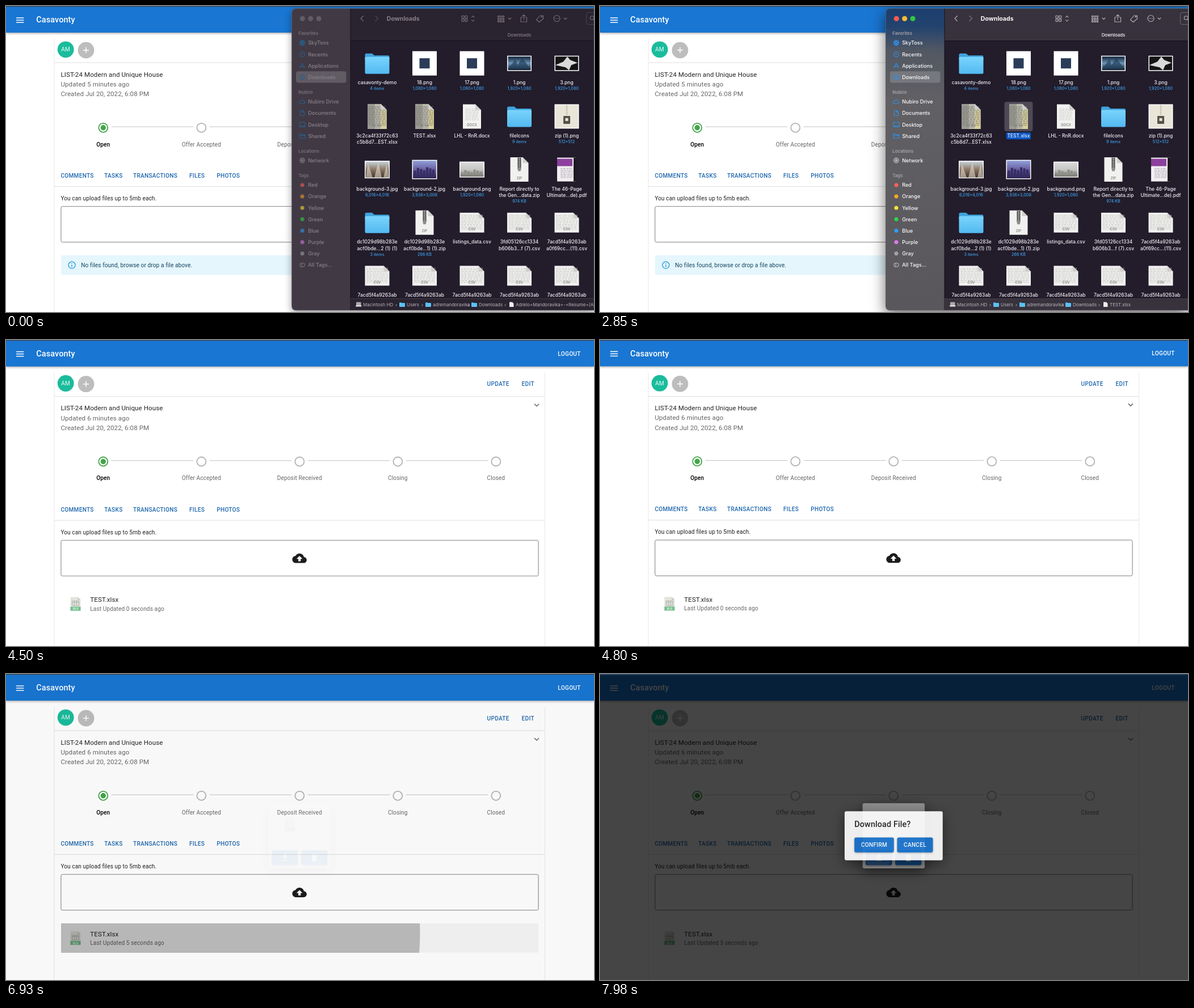
An HTML page that plays this animation: 1036x540 px, repeating every 8 s.

```html
<!DOCTYPE html>
<html lang="en">
<head>
<meta charset="utf-8">
<title>File upload</title>
<style>
html, body { margin: 0; width: 100%; height: 100%; overflow: hidden; background: #fff; }
svg { display: block; width: 1036px; height: 540px; }
text { white-space: pre; }
.h6 { font: 500 14.4px Roboto, sans-serif; letter-spacing: .0075em; }
.b1 { font: 400 11.52px Roboto, sans-serif; letter-spacing: .0094em; }
.b2 { font: 400 10.08px Roboto, sans-serif; letter-spacing: .0107em; }
.btn { font: 500 10.08px Roboto, sans-serif; letter-spacing: .0286em; }
.sub { fill: #666; }
.link { fill: #1f68ae; }
.mid { text-anchor: middle; }
.side { font: 500 9.1px Inter, sans-serif; fill: var(--text); }
.cap { font: 600 7.8px Inter, sans-serif; fill: var(--cap); }
.bar { font: 700 10.6px Inter, sans-serif; fill: var(--text); }
.tab { font: 500 7.8px Inter, sans-serif; fill: var(--text); text-anchor: middle; }
.name { font: 500 8.5px Inter, sans-serif; fill: #f1eff3; text-anchor: middle; }
.info { font: 500 7.2px Inter, sans-serif; fill: #3f9fe6; text-anchor: middle; }
.path { font: 400 8px Inter, sans-serif; fill: #b9b5bd; }
.kind { font: 500 6px Inter, sans-serif; fill: #777; text-anchor: middle; }
.line { fill: none; stroke: var(--icon); stroke-width: 1.1; stroke-linecap: round; stroke-linejoin: round; }
.blue { fill: none; stroke: var(--blue); stroke-width: 1.1; stroke-linejoin: round; }
#finder { --text: #87818b; --cap: #77717b; --icon: #77717b; --blue: #285f8e; --bar: #2a2330; --dim: .55; }
#finder.on { --text: #fbfafc; --cap: #a5a4a9; --icon: #b6b2ba; --blue: #2a93ee; --bar: #38323d; --dim: 1; }
#frame { filter: drop-shadow(0 5px 7px rgba(0,0,0,.4)); }
.on #frame { filter: drop-shadow(0 8px 13px rgba(0,0,0,.6)); }
#glass { opacity: 0; }
.on #glass { opacity: 1; }
.tags { opacity: var(--dim); }
.lift { filter: drop-shadow(0 1.5px 1.5px rgba(0,0,0,.35)); }
.modal { filter: drop-shadow(0 6px 11px rgba(0,0,0,.5)); }
</style>
</head>
<body>
<svg id="stage" viewBox="0 0 1036 540" xmlns="http://www.w3.org/2000/svg"></svg>
<script>
const T = (x, y, s, cls, more = '') => `<text x="${x}" y="${y}" class="${cls}" ${more}>${s}</text>`;
const R = (x, y, w, h, fill, r = 0, more = '') =>
  `<rect x="${x}" y="${y}" width="${w}" height="${h}" rx="${r}" fill="${fill}" ${more}/>`;
const C = (x, y, r, fill, more = '') => `<circle cx="${x}" cy="${y}" r="${r}" fill="${fill}" ${more}/>`;
const P = (d, more = '') => `<path d="${d}" ${more}/>`;
const G = (body, more = '') => `<g ${more}>${body}</g>`;
const at = (x, y, body) => G(body, `transform="translate(${x} ${y})"`);
const grad = (id, ...stops) => `<linearGradient id="${id}" x2="0" y2="1">` +
  stops.map(([o, c]) => `<stop offset="${o}" stop-color="${c}"/>`).join('') + '</linearGradient>';

const defs = `<defs>
  ${grad('glassFill', [0, '#1d3f70'], [.06, '#24436e'], [.14, '#525863'], [.3, '#616064'], [1, '#59575b'])}
  ${grad('folder', [0, '#7ad4fc'], [1, '#52b9f1'])}
  ${grad('city', [0, '#10243c'], [.5, '#6d94b5'], [1, '#0d1b2c'])}
  ${grad('towers', [0, '#c9d3da'], [.5, '#8a7766'], [1, '#3c332d'])}
  ${grad('dusk', [0, '#8e9fda'], [.5, '#6a5f9f'], [1, '#271f4a'])}
  ${grad('fog', [0, '#dadada'], [.5, '#c6c6c4'], [1, '#77776f'])}
  <clipPath id="row"><rect x="97" y="440" width="841" height="52"/></clipPath>
  <clipPath id="down"><rect x="468" y="311" width="46" height="26" rx="3"/></clipPath>
  <clipPath id="list"><rect x="607" y="62" width="429" height="454"/></clipPath>
</defs>`;

// ---- web page ----
const xls = (x, y) => at(x, y,
  P('M0 0h13l5 5v19H0z', 'fill="#e3e3dd"') + P('M13 0v5h5z', 'fill="#c3c9c0"') +
  P('M3 7h12v8H3zM3 9.5h12M7 7v8M11 7v8', 'fill="none" stroke="#a9aea6" stroke-width=".9"') +
  R(0, 17, 18, 7, '#74bf8e') +
  T(9, 22.6, 'XLS', 'mid', 'font-family="Roboto, sans-serif" font-size="5.6" font-weight="700" fill="#e6f4ea"'));

function stepper() {
  return ['Open', 'Offer Accepted', 'Deposit Received', 'Closing', 'Closed'].map((s, i) => {
    const x = 171.3 + 173 * i, c = i ? '#b3b3b3' : '#43a548';
    return (i < 4 ? R(x + 14.5, 212.6, 144.5, 1, '#c2c2c2') : '') +
      C(x, 214.8, 8, 'none', `stroke="${c}" stroke-width="1.8"`) + (i ? '' : C(x, 214.8, 4.7, c)) +
      T(x, 247.6, s, 'b2 mid', i ? 'fill="#666"' : 'font-weight="500" style="font-weight:500"');
  }).join('');
}

const cloud = 'M19.35 10.04C18.67 6.59 15.64 4 12 4 9.11 4 6.6 5.64 5.35 8.04 2.34 8.36 0 10.91 0 14c0 3.31 2.69 6 6 6h13c2.76 0 5-2.24 5-5 0-2.64-2.05-4.78-4.65-4.96zM14 13v4h-4v-4H7l5-5 5 5h-3z';
const page = G(
  R(0, 0, 1036, 47, '#1976d2', 0, 'style="filter:drop-shadow(0 1.5px 2px rgba(0,0,0,.4))"') +
  [20.2, 24.2, 28.2].map(y => R(18, y, 13.4, 1.5, '#fff')).join('') +
  T(53.3, 29.2, 'Casavonty', 'h6', 'fill="#fff"') + T(972.3, 28, 'LOGOUT', 'btn', 'fill="#fff"') +
  R(84.5, 58, 1, 482, '#e8e8e8') + R(949, 58, 1, 482, '#e8e8e8') +
  R(85, 99.5, 864, 1, '#dedede') + R(85, 318, 864, 1, '#dedede') +
  C(105.2, 76.8, 14.4, '#1abc9c') + T(105.2, 80.4, 'AM', 'btn mid', 'fill="#e8fbf6" style="font-weight:400"') +
  C(141, 78, 14.4, '#bdbdbd') + P('M136 78h10M141 73v10', 'stroke="#fff" stroke-width="1.5"') +
  T(847.6, 81.6, 'UPDATE', 'btn link') + T(908.6, 81.6, 'EDIT', 'btn link') +
  P('M931 113l4 4 4-4', 'fill="none" stroke="#666" stroke-width="1.5"') +
  T(96.4, 124.5, 'LIST-24 Modern and Unique House', 'b1', 'fill="#212121"') +
  T(96.4, 142, '', 'b1 sub', 'id="updated"') +
  T(96.4, 159.2, 'Created Jul 20, 2022, 6:08 PM', 'b1 sub') +
  stepper() +
  [['COMMENTS', 96.4], ['TASKS', 173.3], ['TRANSACTIONS', 224], ['FILES', 323], ['PHOTOS', 371.3]]
    .map(([s, x]) => T(x, 303, s, 'btn link')).join('') +
  T(96.4, 343, 'You can upload files up to 5mb each.', 'b2', 'fill="#212121"') +
  R(97, 353.7, 841, 63, '#fff', 2.5, 'stroke="#8d8d8d" style="filter:drop-shadow(0 .8px .5px rgba(0,0,0,.3))"') +
  at(504.4, 372.7, P(cloud, 'transform="scale(1.06)" fill="#1c1c1c"')) +
  G(R(97, 440, 841, 34.5, '#e5f6fd', 3) +
    C(116, 457.2, 6, 'none', 'stroke="#1c95d6" stroke-width="1.2"') +
    P('M116 453.8v1.4M116 456.6v4', 'stroke="#1c95d6" stroke-width="1.3"') +
    T(132.3, 460.8, 'No files found, browse or drop a file above.', 'b2', 'fill="#14455f"'), 'id="alert"') +
  G(R(97, 440, 841, 51.7, '#f3f3f3', 0, 'id="hover"') + xls(113.5, 454) +
    T(148.3, 462.6, 'TEST.xlsx', 'b1', 'fill="#212121"') + T(148.3, 478, '', 'b2 sub', 'id="ago"') +
    G(C(261, 457, 0, '#000', 'id="ripple"'), 'clip-path="url(#row)"'), 'id="file"'), 'id="page"');

// ---- file window ----
const fold = (w, h, body) => P(`M${-w / 2} ${-h / 2}h${w - 10}l10 10v${h - 10}h${-w}z`, 'fill="#f1f1ef"') + body +
  P(`M${w / 2 - 10} ${-h / 2}v10h10z`, 'fill="#cfcfcc"');
const rules = (w, n, y, c) => Array.from({ length: n }, (_, i) =>
  P(`M${-w / 2} ${y + i * 2.7}h${w}`, `stroke="${c}" stroke-width="1" stroke-dasharray="${3 + i % 3} 1 ${5 - i % 2} 1.6"`)).join('');
const kind = (s, y = 19) => T(0, y, s, 'kind');
const photo = (w, h, fill, body = '') => R(-w / 2, -h / 2, w, h, '#fff') + R(1.5 - w / 2, 1.5 - h / 2, w - 3, h - 3, fill) + body;
const bars = (c, base, top) => [0, 1, 2, 3, 4, 5, 6].map(i =>
  R(-19 + i * 5.4, base - top - (i * 5 % 7), 4, top + (i * 5 % 7), c)).join('');
const art = {
  folder: P('M-21.5-15q0-2.5 2.500-2.500h10l4 3.500h24q2.500 0 2.500 2.500v5h-43z', 'fill="#3fa3dc"') +
    R(-21.5, -11.5, 43, 30, 'url(#folder)', 2.5),
  mark: R(-21.5, -21.5, 43, 43, '#fff') + R(-9, -9, 18, 18, '#2a3c58'),
  city: photo(43, 27, 'url(#city)', P('M-19 9l12-16 4 10 8-13 13 18z', 'fill="#22425f" opacity=".7"')),
  hands: photo(43, 27, '#151515', P('M-20 3l14-6 7-9 5 6 13 5-11 4-4 9-6-5z', 'fill="#d9d9d9"')),
  xlsx: fold(33, 44, R(-16.5, -22, 13, 44, '#9b9b94') + R(-3.5, -22, 10, 44, '#bbb9ac') + R(6.5, -12, 10, 34, '#d8d09b') +
    rules(31, 13, -17, '#77776f')) + kind('XLSX'),
  docx: fold(32, 43, rules(23, 8, -13, '#c9c9c9')) + kind('DOCX', 17),
  zip: fold(32, 43, R(-3, -21, 6, 21, '#4b4b4b') + P('M0-21v18', 'stroke="#ddd" stroke-width="3" stroke-dasharray="1 1.5"') +
    R(-2.5, -4, 5, 7, '#8d8d8d', 1)) + kind('ZIP', 17),
  zipPng: R(-21.5, -21.5, 43, 43, '#fff') + R(-20, -20, 40, 40, '#e9e5d9') + P('M0-20v18', 'stroke="#b8ae95" stroke-width="2.5" stroke-dasharray="1.5 1.5"') +
    R(-6, -1, 12, 14, '#55524b', 1) + R(-2.5, 3, 5, 5, '#e9e5d9'),
  towers: photo(44, 31, 'url(#towers)', P('M-20 14l4-24 8 24zM-5 14l7-27 6 27zM11 14l6-24 3 24z', 'fill="#e4d9c9" opacity=".6"')),
  dusk: photo(44, 34, 'url(#dusk)', bars('#372d66', 14, 12)),
  fog: photo(44, 28, 'url(#fog)', bars('#8d8d88', 9, 3)),
  pdf: R(-17, -21, 34, 42, '#f2eff2') + R(-17, -19, 27, 13, '#8d3f9e') + R(12, -21, 5, 42, '#1d1a20') + rules(22, 7, -2, '#a8a2aa'),
  csv: fold(43, 35, rules(38, 10, -13, '#c3c3c0')) + kind('CSV', 14)
};
const hash = '7acd5f4a9263ab';
const files = [
  ['folder', 'casavonty-demo', '', '4 items'], ['mark', '18.png', '', '1,080×1,080'], ['mark', '17.png', '', '1,080×1,080'],
  ['city', '1.png', '', '1,920×1,080'], ['hands', '3.png', '', '1,920×1,080'],
  ['xlsx', '3c2ca4f33f72c63', 'c5b8d7...EST.xlsx'], ['xlsx', 'TEST.xlsx'], ['docx', 'LHL - RnR.docx'],
  ['folder', 'fileIcons', '', '9 items'], ['zipPng', 'zip (1).png', '', '512×512'],
  ['towers', 'background-3.jpg', '', '6,016×4,016'], ['dusk', 'background-2.jpg', '', '3,936×3,008'],
  ['fog', 'background.png', '', '1,920×1,080'], ['zip', 'Report directly to', 'the Gen...data.zip', '974 KB'],
  ['pdf', 'The 46-Page', 'Ultimate...de).pdf'],
  ['folder', 'dc1029d98b283e', 'acf0bde...2 (1) (1)', '3 items'], ['zip', 'dc1029d98b283e', 'acf0bde...1) (1).zip', '266 KB'],
  ['csv', 'listings_data.csv'], ['csv', '3fd05126cc1334', 'b606b3...f (7).csv'], ['csv', hash, 'a0f69cc...(11).csv'],
  ...Array(5).fill(['csv', hash])
];
const grid = files.map(([icon, a, b, info], i) => at(654 + i % 5 * 83.5, 101.2 + Math.floor(i / 5) * 93.7,
  art[icon] + T(0, 37, a, 'name') + (b ? T(0, 48.3, b, 'name') : '') + (info ? T(0, b ? 58.3 : 47.3, info, 'info') : ''))).join('');

const pill = R(-21.5, 28.3, 43, 12, '#0a58c9', 2) + T(0, 37, 'TEST.xlsx', 'name');
const picked = at(737.5, 194.9, R(-25, -26, 50, 52, '#fff', 4, 'opacity=".2"') + art.xlsx + pill);

const glyph = {
  drop: C(0, 0, 4.6, 'var(--blue)', 'opacity=".75"'),
  clock: C(0, 0, 4.4, 'none') + P('M0-2.500v2.700h-2'),
  app: P('M-4.500 4l4.500-8.500 4.500 8.500M-4 1.500h8'),
  arrow: C(0, 0, 4.4, 'none') + P('M0-2.500v5M-2 .5l2 2 2-2'),
  cloud: P('M-3 3.500q-3-.5-2.300-3.200 1-2 2.800-1.300 1-3 4-2 1.800 1 1.600 2.700 2.400.6 1.800 2.600-.6 1.200-2 1.200z'),
  doc: P('M-3.500-4.500h4l3 3v6h-7zM.5-4.500v3h3'),
  desk: P('M-5-4h10v8h-10zM-5 2.500h10'),
  share: P('M-5-3.500h3.500l1 1.500h5.500v6h-10zM-5-.5h10'),
  net: C(0, 0, 4.4, 'none') + P('M-4 0h8M0-4v8M-2.800-2.800l5.600 5.600M2.800-2.800l-5.600 5.600')
};
const entry = (s, y, icon, cls = 'blue') => at(522, y, G(glyph[icon], `class="${cls}"`)) + T(532.2, y + 3.3, s, 'side');
const tags = [['Red', '#fa6159'], ['Orange', '#f7a823'], ['Yellow', '#fbe233'], ['Green', '#2bd944'],
  ['Blue', '#2f9df5'], ['Purple', '#e078ee'], ['Gray', '#a4a2a7']];
const sidebar =
  R(511, 115.3, 88.5, 20.3, '#fff', 4, 'opacity=".17"') +
  [['Favorites', 51], ['Nubiro', 155], ['Locations', 258.7], ['Tags', 302]].map(([s, y]) => T(515.3, y, s, 'cap')).join('') +
  entry('SkyToss', 65, 'drop') + entry('Recents', 85.2, 'clock') + entry('Applications', 105.4, 'app') + entry('Downloads', 125.5, 'arrow') +
  entry('Nubiro Drive', 168.8, 'cloud') + entry('Documents', 189, 'doc') + entry('Desktop', 209.2, 'desk') + entry('Shared', 229.3, 'share') +
  entry('Network', 272.5, 'net', 'line') +
  tags.map(([s, c], i) => G(C(522, 315.9 + i * 20.15, 3.5, c), 'class="tags"') + T(532.2, 319.2 + i * 20.15, s, 'side')).join('') +
  G(R(518, 453.8, 8, 6.4, 'none', 2.5) + P('M521 454v6'), 'class="line"') + T(532.2, 460.3, 'All Tags...', 'side');

const cells = (x, n, s) => Array.from({ length: n * n }, (_, i) => R(x + i % n * s, 17.3 + Math.floor(i / n) * s, s - 1.8, s - 1.8, 'none', .5)).join('');
const toolbar = ['#ff5b51', '#f6bd34', '#2fc844'].map((c, i) =>
    C(522.3 + i * 14.4, 22.3, 4.5, '#625c66') + C(522.3 + i * 14.4, 22.3, 4.5, c, 'class="lamp"')).join('') +
  T(670.8, 26, 'Downloads', 'bar') + T(904.5, 54, 'Downloads', 'tab') +
  G(P('M629.500 17.500l-4.500 4.500 4.500 4.500') + P('M651 17.500l4.500 4.500-4.500 4.500', 'opacity=".5"') +
    cells(803, 2, 5.8) + P('M820.500 20l2.300-2.500 2.300 2.500M820.500 24.500l2.300 2.500 2.300-2.500') +
    cells(866.5, 3, 4.3) + P('M885 21l2.500 2.500 2.500-2.500') +
    P('M909.500 20h-2.500v8h10.500v-8h-2.500M912.300 24v-8.500M909.800 18l2.500-2.500 2.500 2.500') +
    P('M934.500 24l6.500-7h5.500v5.500l-7 6z') + C(944, 19, .7, 'none') +
    C(970.5, 22, 5.5, 'none') + P('M967.500 22h.1M970.500 22h.1M973.500 22h.1', 'stroke-width="1.500"') + P('M983 21l2.500 2.500 2.500-2.500') +
    R(1022.5, 11.5, 40, 21, 'none', 4, 'opacity=".4"') + C(1032.5, 21, 3.2, 'none') + P('M1034.800 23.500l3 3'), 'class="line"');

const crumb = x => at(x + 5, 527, R(-5, -4, 4, 3, '#3fa3dc', .8) + R(-5, -3, 10, 7, '#5cc0f3', 1));
const pathbar = R(607, 516.5, 429, 20.5, 'var(--bar)') + R(607, 516, 429, .8, '#49434e') +
  R(617, 522.5, 8.5, 6, '#aaa', 1) + R(616.3, 528, 10, 2.5, '#dedede', .5) +
  [693, 739, 820].map(crumb).join('') +
  [['Macintosh HD', 629], ['Users', 706], ['adremandoravika', 752], ['Downloads', 833]].map(([s, x]) => T(x, 530, s, 'path')).join('') +
  [686, 732, 813, 878].map(x => T(x, 530, '›', 'path')).join('') +
  P('M887 522.500h5l2.500 2.500v6h-7.500z', 'fill="#eee"') + T(898, 530, '', 'path', 'id="leaf"');

const shape = 'M1036 4.500H511.500q-8 0-8 8V529q0 8 8 8H1036z';
const side = 'M607 4.500H511.500q-8 0-8 8V529q0 8 8 8H607z';
const finder = G(
  P(shape, 'fill="#221c2b" id="frame"') + P(side, 'fill="#413a45"') + P(side, 'fill="url(#glassFill)" id="glass"') +
  R(607, 4.5, 429, 57, 'var(--bar)') + R(607, 61, 429, 1, '#121016') + R(606.5, 4.5, 1, 532.5, '#17131b') +
  sidebar + toolbar + G(grid + G(picked, 'id="picked"'), 'clip-path="url(#list)"') + pathbar +
  P(shape, 'fill="none" stroke="#777079" stroke-opacity=".6"'), 'id="finder"');
const ghost = G(art.xlsx + pill, 'id="ghost" opacity=".85"');

// ---- dialogs ----
const icon24 = (x, y, d) => P(d, `transform="translate(${x} ${y}) scale(.72)" fill="#fff"`);
const button = (x, y, w, more = '') => R(x, y, w, 26.3, '#1976d2', 3, `class="lift" ${more}`);
const shade = id => R(0, 1.5, 1036, 538.5, '#000', 0, `id="${id}" opacity="0"`);
const dialogs = shade('shade1') +
  G(R(462.7, 228, 109.4, 115, '#fff', 3, 'class="modal"') + xls(491, 253.7) +
    button(468.3, 311, 46, 'id="save"') + button(520.2, 311, 46) +
    G(C(490.5, 323.3, 0, '#fff', 'id="ripple2"'), 'clip-path="url(#down)"') +
    icon24(482.6, 315.2, 'M5 20h14v-2H5v2zM19 9h-4V3H9v6H5l7 7 7-7z') +
    icon24(534.6, 315.5, 'M6 19c0 1.1.9 2 2 2h8c1.1 0 2-.9 2-2V7H6v12zM19 4h-3.500l-1-1h-5l-1 1H5v2h14V4z'), 'id="box1"') +
  shade('shade2') +
  G(R(431, 242.3, 172.8, 86.5, '#fff', 3, 'class="modal"') + T(448.3, 270, 'Download File?', 'h6', 'fill="#212121"') +
    button(448.2, 288.5, 69.6) + button(523.5, 288.5, 63) +
    T(483, 305.2, 'CONFIRM', 'btn mid', 'fill="#fff"') + T(555, 305.2, 'CANCEL', 'btn mid', 'fill="#fff"'), 'id="box2"');

document.getElementById('stage').innerHTML =
  defs + R(0, 0, 1036, 540, '#fff') + page + R(0, 0, 1036, 1.3, '#3b4653') + finder + ghost + dialogs;

// ---- timeline ----
const $ = id => document.getElementById(id);
const set = (id, o) => { for (const k in o) $(id).setAttribute(k, o[k]); };
const show = (id, on) => set(id, { visibility: on ? 'visible' : 'hidden' });
const label = (id, s) => { if ($(id).textContent !== s) $(id).textContent = s; };
const span = (t, a, b) => Math.min(1, Math.max(0, (t - a) / (b - a)));

// cubic-bezier(.4, 0, .2, 1)
function ease(x) {
  let lo = 0, hi = 1;
  for (let i = 0; i < 20; i++) {
    const s = (lo + hi) / 2, q = 1 - s;
    if (1.2 * q * q * s + .6 * q * s * s + s * s * s < x) lo = s; else hi = s;
  }
  return lo * lo * (3 - 2 * lo);
}
function ripple(id, t, start, from, release, max) {
  const k = ease(span(t, start, start + 550));
  const alpha = (.1 + .2 * k) * (1 - ease(span(t, release, release + 550)));
  set(id, { r: max * k, opacity: t < from ? 0 : alpha });
}

function draw(t) {
  const focus = t >= 1290;
  $('finder').setAttribute('class', focus ? 'on' : '');
  document.querySelectorAll('.lamp').forEach(e => e.setAttribute('opacity', focus ? 1 : 0));
  set('finder', { opacity: 1 - ease(span(t, 2835, 3270)) });
  $('finder').style.display = t < 3270 ? '' : 'none';
  $('picked').style.display = focus ? '' : 'none';
  label('leaf', focus ? 'TEST.xlsx' : 'Adrelo+Mandoravika+-+Resume+(Apr');

  const p = span(t, 1890, 2670), d = p * p * (3 - 2 * p);
  show('ghost', t >= 1890 && t < 2700);
  set('ghost', { transform: `translate(${702.7 - 380.2 * d} ${198 + 196 * d})` });

  const nudge = ease(span(t, 4350, 4800)) - ease(span(t, 4920, 4980));
  set('page', { transform: `translate(0 ${-.6 * nudge})` });
  label('updated', `Updated ${t < 3750 ? 5 : 6} minutes ago`);
  label('ago', `Last Updated ${t < 6900 ? 0 : 5} seconds ago`);
  $('alert').style.display = t < 3750 ? '' : 'none';
  $('file').style.display = t < 3750 ? 'none' : '';
  set('hover', { opacity: t < 6750 ? 0 : 1 - span(t, 6900, 7050) });
  ripple('ripple', t, 6688, 6750, 6900, 678);

  const a = ease(span(t, 6900, 7125)), b = ease(span(t, 7835, 8060));
  set('shade1', { opacity: a / 2 });
  set('box1', { opacity: a });
  set('shade2', { opacity: b / 2 });
  set('box2', { opacity: b });
  set('save', { fill: t >= 7710 ? '#1565c0' : '#1976d2' });
  ripple('ripple2', t, 7680, 7710, 7835, 27);
}

const start = performance.now();
function tick() {
  draw((performance.now() - start) % 8000);
  requestAnimationFrame(tick);
}
tick();
</script>
</body>
</html>
```
